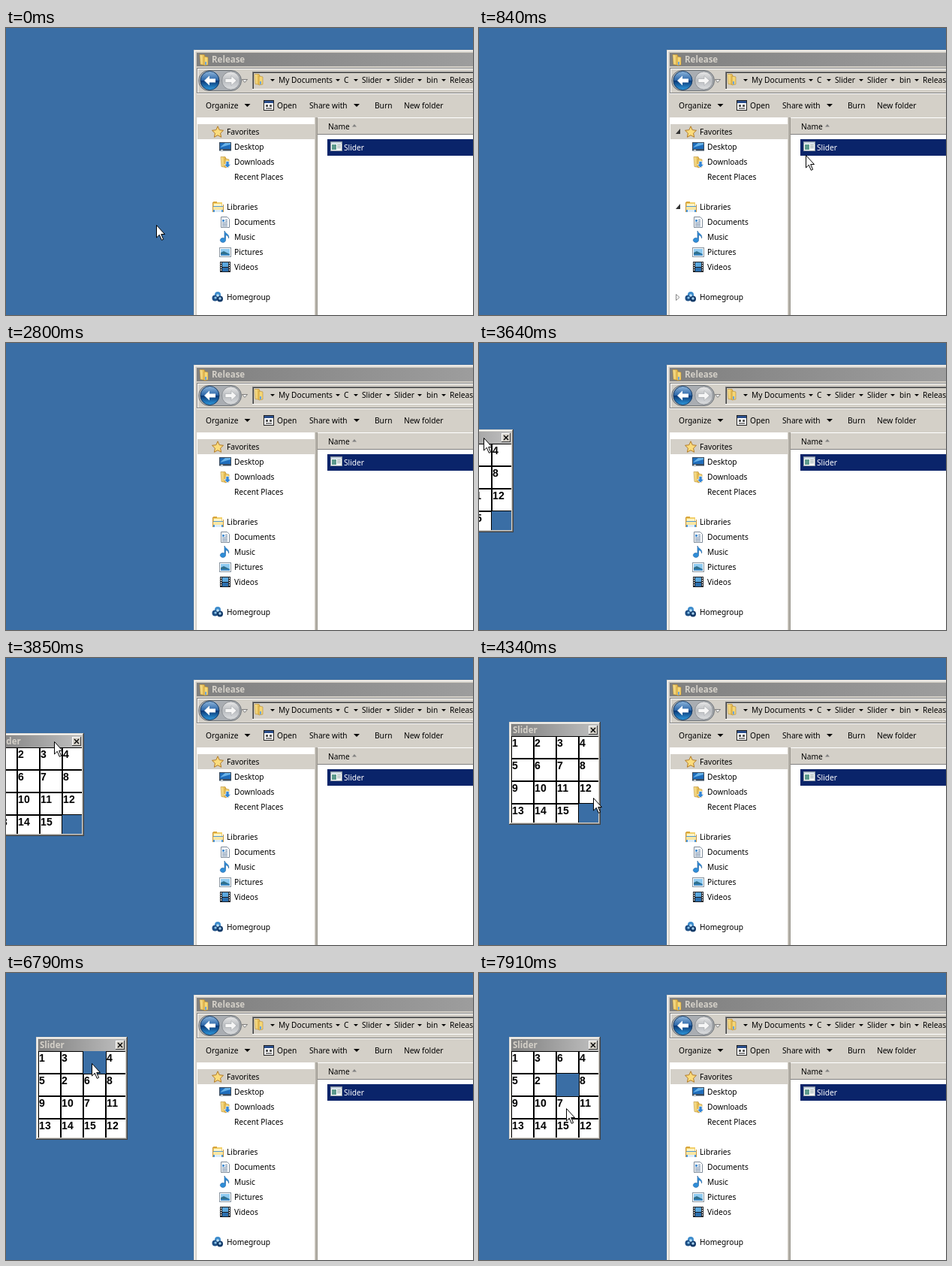
Write an HTML page that moves like this. It is 622 px wide and 382 px high and loops after 8 s.

```html
<!DOCTYPE html>
<html lang="en">
<head>
<meta charset="utf-8">
<title>Slider</title>
<style>
  html, body { margin: 0; width: 100%; height: 100%; overflow: hidden; background: #3a6ea5; }
  svg { display: block; width: 622px; height: 382px; }
  text { font: 10.2px "Noto Sans", "Open Sans", sans-serif; white-space: pre; }
  .title { font-size: 11.5px; font-weight: bold; }
  .num { font: bold 14px "Liberation Sans", Arial, sans-serif; letter-spacing: .2px; }
  rect { shape-rendering: crispEdges; }
</style>
</head>
<body>
<svg id="stage" viewBox="0 0 622 382" xmlns="http://www.w3.org/2000/svg">
  <defs>
    <linearGradient id="active"><stop stop-color="#0a246a"/><stop offset="1" stop-color="#506fa8"/></linearGradient>
    <linearGradient id="idle"><stop stop-color="#808080"/><stop offset="1" stop-color="#9d9d9d"/></linearGradient>
    <linearGradient id="small"><stop stop-color="#808080"/><stop offset="1" stop-color="#c0c0c0"/></linearGradient>
    <linearGradient id="blue" x2="0" y2="1"><stop stop-color="#8fb6dc"/><stop offset=".48" stop-color="#2b66a8"/><stop offset=".52" stop-color="#0b3a78"/><stop offset="1" stop-color="#2f9be0"/></linearGradient>
    <linearGradient id="grey" x2="0" y2="1"><stop stop-color="#e9e9e9"/><stop offset=".5" stop-color="#b9bcc0"/><stop offset="1" stop-color="#dcdee0"/></linearGradient>
    <linearGradient id="gold" x2="1"><stop stop-color="#fbe9a0"/><stop offset="1" stop-color="#e0ae3c"/></linearGradient>
    <clipPath id="client"><rect x="3" y="19" width="116" height="115"/></clipPath>
  </defs>
</svg>
<script>
const LOOP = 8000, STEP = 70, FACE = '#d4d0c8', NAVY = '#0a246a';
const stage = document.getElementById('stage');

const rect = (x, y, w, h, fill, more = '') =>
  `<rect x="${x}" y="${y}" width="${w}" height="${h}" fill="${fill}" ${more}/>`;
const path = (d, fill, more = '') => `<path d="${d}" fill="${fill}" ${more}/>`;
const text = (x, y, s, fill = '#000', more = '') => `<text x="${x}" y="${y}" fill="${fill}" ${more}>${s}</text>`;
const at = (x, y, body) => `<g transform="translate(${x} ${y})">${body}</g>`;
const down = (x, y, r) => path(`M${x - r} ${y - r / 2}h${2 * r}l${-r} ${r}z`, '#000');
const bevel = (x, y, w, h, light, dark) =>
  rect(x, y, w, 1, light) + rect(x, y, 1, h, light) +
  rect(x, y + h - 1, w, 1, dark) + rect(x + w - 1, y, 1, h, dark);

// 16 x 16 icons
const folder = path('M2 1.5h6l1 2v12l-6-1z', 'url(#gold)', 'stroke="#b98a2c" stroke-width=".6"') +
  path('M8 4l5 1v10l-5 1z', '#f5d675', 'stroke="#b98a2c" stroke-width=".6"') + rect(9, 11, 2, 4, '#6fa4d6');
const page = path('M2.5 1.5h8l3 3v11h-11z', '#fff', 'stroke="#7d8a99"');
const icons = {
  star: path('M8 .8l2.2 4.9 5.3.6-3.9 3.7 1 5.3L8 12.7l-4.6 2.6 1-5.3L.5 6.3l5.3-.6z', '#fbdc7c', 'stroke="#b27a26"'),
  desktop: rect(0, 2, 16, 11, '#3a4a5c') + rect(1, 3, 14, 8, '#1f6dbb') + path('M1 9l7-6h7v2z', '#69b4ea') +
    rect(2, 12, 3, 1, '#e8f0f8') + rect(0, 13, 16, 1, '#9aa6b0'),
  downloads: folder + path('M9 7.5h4v4h2.5L11 16 6.500 11.500H9z', '#3486d8', 'stroke="#fff" stroke-width=".6"'),
  libraries: rect(1, 2, 13, 5, '#f2cf69') + rect(2, 1, 5, 2, '#d9a63a') + rect(3, 4, 10, 3, '#fff4c6') +
    rect(1, 7, 15, 8, '#4f98d8') + rect(2, 8, 13, 4, '#f9e7a2') + rect(4, 12, 9, 3, '#dcecf8') +
    rect(1, 2, 1, 13, '#c8963a') + rect(15, 5, 1, 10, '#c8963a'),
  documents: page + rect(4, 5, 3, 3, '#4d92d2') + [5, 7, 9, 11, 13].map((y, i) =>
    rect(i < 2 ? 8 : 4, y, i < 2 ? 3 : 7, 1, '#6c87a5')).join(''),
  music: path('M7 0c1 4 7 4 5.500 10 0-3-2-4-4-4.500V12.500a3.600 3 0 1 1-1.500-2.500z', '#2f8ed8', 'stroke="#1c5d9e" stroke-width=".6"'),
  pictures: rect(.5, 2.5, 15, 12, '#fff', 'stroke="#8794a0"') + rect(2, 4, 12, 9, '#8fcaf0') +
    path('M2 9l4-2 8 4v2H2z', '#2f6f8c') + rect(2, 11, 12, 2, '#3c87c2'),
  videos: rect(1, 1, 14, 14, '#1c1f24') + rect(4, 2, 8, 6, '#5aa6dc') + rect(4, 9, 8, 5, '#2b6fae') +
    [2, 5, 8, 11].map(y => rect(2, y, 1, 2, '#fff') + rect(13, y, 1, 2, '#fff')).join(''),
  group: [[8, 5, 4, '#3d8ccc'], [4.500, 9.500, 4, '#1d4f86'], [11, 10.500, 4, '#143a68'], [8, 6, 1.800, '#bfe2f8'],
    [5, 9, 1.600, '#8cc4ea'], [11, 10, 1.700, '#a9d4f2']].map(([x, y, r, c]) =>
    `<circle cx="${x}" cy="${y}" r="${r}" fill="${c}"/>`).join(''),
  app: rect(.5, 1.500, 15, 12, '#fff', 'stroke="#8c96a0"') + rect(1, 2, 14, 2, '#c5d3e0') +
    rect(2, 5, 6, 7, '#5c9a8c') + rect(9, 5, 5, 1, '#9aa') + rect(9, 7, 5, 1, '#9aa') + rect(9, 9, 5, 1, '#9aa'),
  open: rect(.5, 1.500, 13, 13, '#fff', 'stroke="#222"') + rect(1, 2, 12, 3, '#2b4f8c') +
    rect(3, 7, 3, 3, '#555') + rect(8, 7, 3, 3, '#555') + rect(3, 11, 8, 2, '#888')
};

const tree = [
  [274, 138, 'star', 'Favorites'], [284, 158, 'desktop', 'Desktop'], [284, 178, 'downloads', 'Downloads'],
  [284, 198, '', 'Recent Places'], [274, 238, 'libraries', 'Libraries'], [284, 258, 'documents', 'Documents'],
  [284, 278, 'music', 'Music'], [284, 298, 'pictures', 'Pictures'], [284, 318, 'videos', 'Videos'],
  [274, 358, 'group', 'Homegroup']
];
const crumbs = [[363, 'My Documents'], [450, 'C'], [474, 'Slider'], [517, 'Slider'], [560, 'bin'], [591, 'Release']];

function explorer() {
  const nav = path('M270 56.500h30a13.500 13.500 0 0 1 0 27h-30a13.500 13.500 0 0 1 0-27z', '#a9adb2', 'stroke="#6f7478"') +
    `<circle cx="271.500" cy="70" r="12.500" fill="url(#blue)" stroke="#173c66"/>` +
    `<circle cx="299.500" cy="70" r="12" fill="url(#grey)" stroke="#8b8f93"/>` +
    path('M264 70l7-6.500v4h8v5h-8v4z', '#fff') +
    path('M307 70l-7-6.500v4h-8v5h8v4z', '#f6f6f6', 'stroke="#a2a5a8" stroke-width=".6"') +
    path('M314.500 68.500h7l-3.500 4z', '#eee', 'stroke="#666" stroke-width=".8"');
  return rect(250, 29, 372, 353, FACE) + rect(251, 30, 371, 1, '#fff') + rect(251, 30, 1, 352, '#fff') +
    rect(254, 33, 368, 18, 'url(#idle)', 'id="bar"') + at(256, 34, folder) +
    text(274, 46, 'Release', FACE, 'id="caption" class="title"') +
    bevel(254, 53, 380, 34, '#808080', '#808080') + rect(255, 54, 367, 1, '#fff') + rect(255, 54, 1, 32, '#fff') +
    rect(254, 87, 368, 1, '#fff') + nav +
    bevel(328, 58, 310, 24, '#808080', '#fff') + rect(329, 59, 293, 1, '#404040') + rect(329, 59, 1, 22, '#404040') +
    at(329, 60, folder) +
    [355, 442, 466, 509, 551, 583].map(x => down(x, 69.500, 3)).join('') +
    crumbs.map(([x, s]) => text(x, 73, s)).join('') +
    text(266, 107, 'Organize') + down(321.500, 103, 4) + at(343, 95, icons.open) + text(361, 107, 'Open') +
    text(404, 107, 'Share with') + down(467, 103, 4) + text(491, 107, 'Burn') + text(530, 107, 'New folder') +
    rect(254, 119, 157, 263, '#fff') + rect(255, 128, 156, 20, FACE) +
    tree.map(([x, y, icon, s]) => (icon ? at(x, y - 8, icons[icon]) : '') +
      text(x === 274 ? 294 : 304, y + 4, s)).join('') +
    `<g id="twisties">` + [138, 238].map(y => path(`M268 ${y - 4}v7h-6z`, '#333')).join('') +
    path('M262.500 354.500l4.500 4-4.500 4z', '#fff', 'stroke="#888"') + '</g>' +
    rect(412, 119, 2, 263, '#b4b0a8') + rect(414, 119, 208, 263, '#fff') +
    rect(415, 120, 207, 21, FACE) + rect(414, 141, 208, 1, '#808080') + rect(414, 119, 1, 263, '#9a968e') +
    text(429, 135, 'Name') + path('M461 131.500h6l-3-3.500z', '#808080') +
    rect(428, 148, 194, 22, NAVY) + at(432, 150, icons.app) + text(450, 163, 'Slider', '#fff');
}

function puzzle() {
  let tiles = '';
  for (let n = 1; n < 16; n++)
    tiles += `<g class="tile">${rect(0, 0, 30, 30, '#000')}${rect(1, 1, 28, 28, '#fff')}` +
      text(1, 14, n, '#000', 'class="num"') + '</g>';
  return rect(0, 0, 122, 137, FACE) + bevel(0, 0, 122, 137, FACE, '#404040') + bevel(1, 1, 120, 135, '#fff', '#808080') +
    rect(3, 3, 116, 16, 'url(#small)') + text(5, 15, 'Slider', FACE, 'class="title"') +
    rect(106, 5, 12, 12, FACE) + bevel(106, 5, 12, 12, '#fff', '#404040') +
    path('M109 8l6 6m0-6l-6 6', 'none', 'stroke="#000" stroke-width="1.400"') +
    rect(3, 19, 116, 115, '#3a6ea5') + `<g clip-path="url(#client)">${tiles}</g>`;
}

stage.insertAdjacentHTML('beforeend', explorer() + `<g id="puzzle">${puzzle()}</g>` +
  path('M.5 .5V17L4.300 13.300 7.300 20.300 9.600 19.300 6.700 12.500H11.500z', '#fff', 'id="cursor" stroke="#000"'));

const $ = id => document.getElementById(id);
const bar = $('bar'), caption = $('caption'), twisties = $('twisties'), win = $('puzzle'), cursor = $('cursor');
const tiles = [...document.querySelectorAll('.tile')];

// [time, x, y] of the pointer tip
const track = [
  [420, 200, 262], [910, 474, 154], [3640, 6, 126], [4060, 122, 96], [4200, 122, 96], [4340, 152, 186],
  [4760, 152, 186], [4970, 112, 172], [5110, 112, 172], [5320, 111, 150], [5530, 82, 136], [5670, 82, 136],
  [6020, 84, 124], [6160, 84, 124], [6300, 84, 130], [6370, 84, 130], [6650, 112, 120], [6720, 112, 120],
  [6790, 114, 120], [6930, 118, 124], [7000, 118, 124], [7210, 120, 136], [7350, 120, 136],
  [7700, 118, 197], [7910, 116, 180]
];
const moves = [[4760, 12], [5110, 11], [5320, 7], [5670, 6], [6160, 2], [6790, 3], [7350, 6]];

function pointer(t) {
  const i = track.findIndex(k => k[0] > t);
  if (i < 1) return (i ? track[track.length - 1] : track[0]).slice(1);
  const [a, b] = [track[i - 1], track[i]], p = (t - a[0]) / (b[0] - a[0]);
  return [1, 2].map(j => Math.round(a[j] + (b[j] - a[j]) * p));
}

function draw(time) {
  const t = Math.floor(time / STEP) * STEP;
  const focused = t >= 1260 && t < 2800;
  bar.setAttribute('fill', focused ? 'url(#active)' : 'url(#idle)');
  caption.setAttribute('fill', focused ? '#fff' : FACE);
  twisties.setAttribute('opacity', t < 630 || t >= 1680 ? 0 : t < 700 || t >= 1610 ? .5 : 1);

  const hidden = t >= 1610 && t < 3640;
  const [x, y] = hidden ? [-50, -50] : pointer(t);
  cursor.setAttribute('transform', `translate(${x} ${y})`);

  const drag = t < 4060;
  win.setAttribute('visibility', t < 3640 ? 'hidden' : 'visible');
  win.setAttribute('transform', `translate(${drag ? x - 82 : 40} ${drag ? y - 11 : 85})`);

  const slots = tiles.map((_, i) => i);
  let gap = 15;
  for (const [when, n] of moves)
    if (t >= when) [slots[n - 1], gap] = [gap, slots[n - 1]];
  tiles.forEach((tile, i) =>
    tile.setAttribute('transform', `translate(${3 + slots[i] % 4 * 30} ${19 + (slots[i] >> 2) * 30})`));
}

function tick() {
  draw(performance.now() % LOOP);
  requestAnimationFrame(tick);
}
tick();
</script>
</body>
</html>
```
